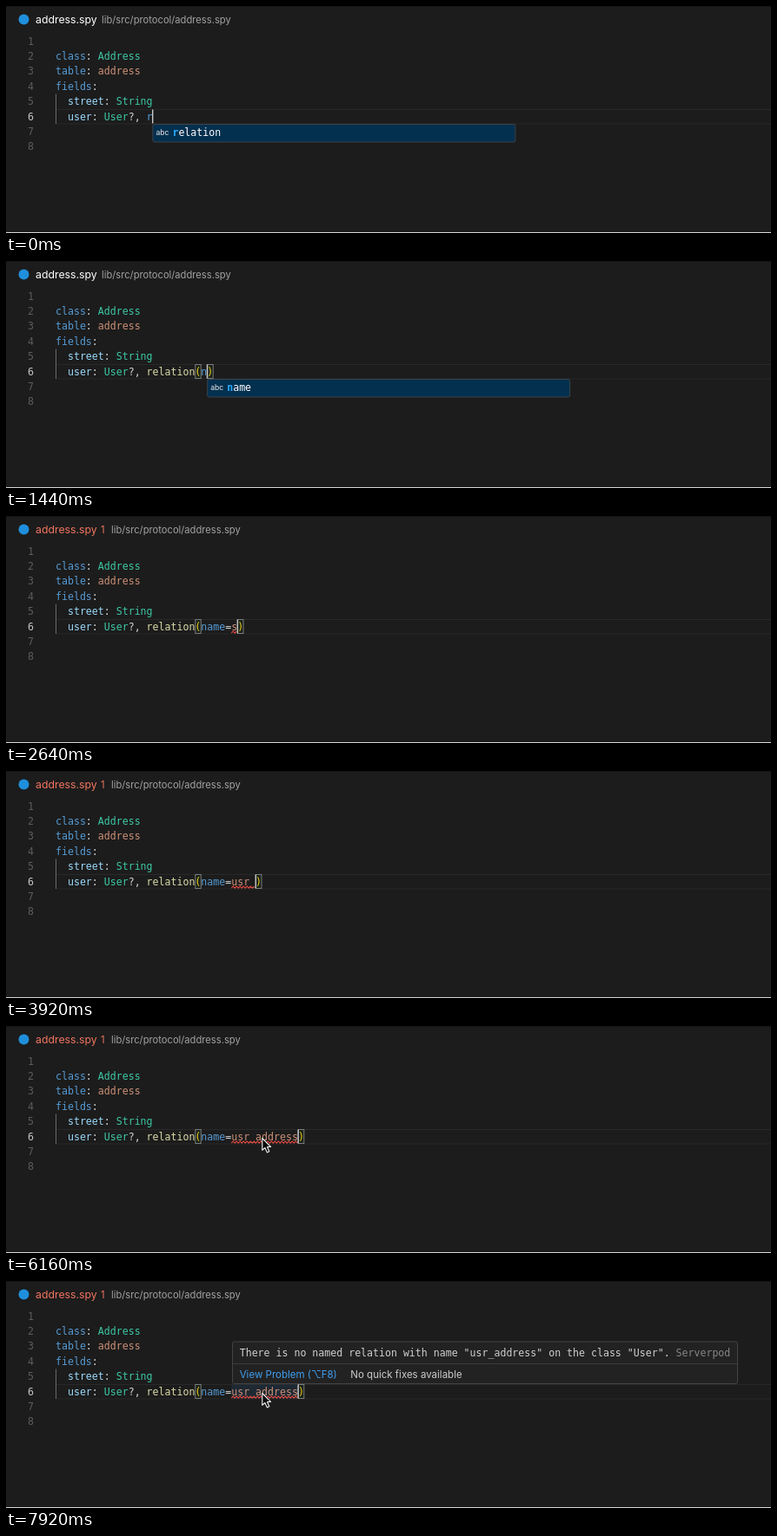
An HTML page that plays this animation: 880x262 px, repeating every 8000 ms.

```html
<!DOCTYPE html>
<html lang="en">
<head>
<meta charset="utf-8">
<title>Editor</title>
<style>
  html, body { margin: 0; width: 100%; height: 100%; overflow: hidden; background: #1c1c1c; }
  svg { display: block; width: 880px; height: 262px; }
  text { white-space: pre; }
  .code { font: 11.585px "DejaVu Sans Mono", monospace; }
  .ui { font: 11.2px Inter, sans-serif; }
  .title { font: 12.3px Inter, sans-serif; }
  .tip { font: 11.5px Inter, sans-serif; }
  .abc { font: 8.6px Inter, sans-serif; }
</style>
</head>
<body>
<svg id="stage" viewBox="0 0 880 262" xmlns="http://www.w3.org/2000/svg"></svg>
<script>
const LOOP = 8000, STEP = 80;
const CHAR = 6.975, LEFT = 57, PITCH = 17.4;
const C = {
  text: '#d4d4d4', key: '#569cd6', type: '#3dc9a5', str: '#ce9178', prop: '#9cdcfe',
  func: '#dcdcaa', gold: '#f0cc20', error: '#f0745f', match: '#2aaaff', dim: '#868686'
};

const svg = document.getElementById('stage');

function add(parent, tag, attrs = {}) {
  const node = document.createElementNS(svg.namespaceURI, tag);
  for (const k in attrs) node.setAttribute(k, attrs[k]);
  parent.appendChild(node);
  return node;
}

function rect(parent, x, y, width, height, fill, extra = {}) {
  return add(parent, 'rect', { x, y, width, height, fill, ...extra });
}

// Each part is [string, colour, weight].
function fillText(node, parts) {
  node.replaceChildren();
  for (const [str, fill, weight = 400] of parts) {
    add(node, 'tspan', { fill, 'font-weight': weight }).textContent = str;
  }
}

function label(parent, cls, x, y, ...parts) {
  const node = add(parent, 'text', { class: cls, x, y });
  fillText(node, parts);
  return node;
}

const show = (node, on) => node.setAttribute('visibility', on ? 'visible' : 'hidden');
const lineY = n => 62 + PITCH * (n - 2);
const colX = n => LEFT + CHAR * n;

// Window
rect(svg, 0, 0, 880, 262, '#1c1c1c');
rect(svg, 0, 0, 880, 1, '#141414');
rect(svg, 0, 261, 880, 1, '#d8d8d8');
add(svg, 'circle', { cx: 20.5, cy: 15.5, r: 6, fill: '#1f8fdc' });
const title = label(svg, 'title', 34, 19.8);
const count = label(svg, 'ui', 109, 19.6, ['1', C.error]);
const path = label(svg, 'ui', 110, 19.5, ['lib/src/protocol/address.spy', '#a2a2a2']);

// Static code
rect(svg, LEFT, 119, 823, 1, '#292929');
rect(svg, LEFT, 135.5, 823, 1, '#292929');
rect(svg, LEFT, 101.5, 1, 34.5, '#686868');
for (let n = 1; n <= 8; n++) {
  label(svg, 'code', 25, lineY(n), [String(n), n === 6 ? '#c6c6c6' : '#5c5c5c']);
}
[
  [['class', C.key], [': ', C.text], ['Address', C.type]],
  [['table', C.key], [': ', C.text], ['address', C.str]],
  [['fields', C.key], [':', C.text]],
  [['  street', C.prop], [': ', C.text], ['String', C.type]]
].forEach((parts, i) => label(svg, 'code', LEFT, lineY(i + 2), ...parts));

// Edited line
const wordMark = rect(svg, 0, 119.5, 0, 16, '#264f78', { 'fill-opacity': 0.25 });
const brackets = [0, 1].map(() =>
  rect(svg, 0, 119.5, 6.4, 16, '#006400', { 'fill-opacity': 0.1, stroke: '#858585', 'stroke-width': 0.9 }));
const edit = label(svg, 'code', LEFT, lineY(6));
const wave = add(svg, 'path', { fill: 'none', stroke: '#e5483f', 'stroke-width': 1.1 });
const caret = rect(svg, 0, 119.5, 1.4, 16, '#c8c8c8');

// Completion list
const popup = add(svg, 'g');
rect(popup, 0.5, 136.5, 417, 20.5, '#04304f', { stroke: '#3c4349', rx: 2 });
label(popup, 'abc', 4, 149.3, ['abc', '#e8e8e8']);
const choice = label(popup, 'code', 23, 150);

// Hover card
const card = add(svg, 'g');
rect(card, 260.5, 70, 581, 48.5, '#222223', { stroke: '#434343', rx: 2 });
rect(card, 261, 95, 580, 1, '#3c3c3c');
label(card, 'code', 268.7, 87,
  ['There is no named relation with name "usr_address" on the class "User". ', '#d0d0d0'],
  ['Serverpod', C.dim]);
label(card, 'tip', 268.7, 111.6, ['View Problem (⌥F8)', '#3f9ff0']);
label(card, 'tip', 396.3, 111.6, ['No quick fixes available', '#cccccc']);

const pointer = add(svg, 'path', {
  d: 'M0 0V13.6L3.1 10.8L5.5 16.2L8 15.1L5.7 9.8H9.8Z',
  fill: '#0a0a0a', stroke: '#f2f2f2', 'stroke-width': 1.1, 'stroke-linejoin': 'round'
});

// Typing: strokes of [time, text before the caret]
const strokes = [[0, 'r']];
function type(text, ...times) {
  let now = strokes[strokes.length - 1][1];
  times.forEach((t, i) => {
    now = text[i] === '<' ? now.slice(0, -1) : now + text[i];
    strokes.push([t, now]);
  });
}
type('elation', 160, 240, 400, 480, 640, 720, 800);
type('(name', 1200, 1440, 1600, 1760, 1840);
type('=s<', 2240, 2560, 2960);
type('usr_', 3200, 3360, 3520, 3760);
type('address', 4080, 4160, 4240, 4400, 4480, 4640, 4880);

const ERROR_AT = 2480, BLINK_AT = 5440, BLINK = 480;
const MOVE_AT = 5680, MOVE_END = 6120, HOVER_AT = 6640;

function drawTitle(bad) {
  fillText(title, [['address.spy', bad ? C.error : '#ffffff']]);
  show(count, bad);
  path.setAttribute('x', bad ? 121 : 110);
}

function drawEdit(typed, t) {
  const [, word, open, key, eq, value] = typed.match(/^(\w+)(\(?)(\w*)(=?)(\w*)$/);
  const start = 15;
  const end = colX(start + typed.length);
  fillText(edit, [
    ['  user', C.prop], [': ', C.text], ['User', C.type], ['?, ', C.text],
    [word, open ? C.func : C.key], [open, C.gold], [key, C.key],
    [eq, C.text], [value, C.str], [open && ')', C.gold]
  ]);

  brackets[0].setAttribute('x', colX(start + word.length) + 0.4);
  brackets[1].setAttribute('x', end + 0.4);
  brackets.forEach(b => show(b, open));

  caret.setAttribute('x', end - 0.6);
  show(caret, t < BLINK_AT || Math.floor((t - BLINK_AT) / BLINK) % 2 === 1);

  const from = colX(start + typed.length - value.length);
  let d = '';
  for (let x = from, up = 0; x <= end; x += 2, up ^= 1) {
    d += (d ? 'L' : 'M') + x + ' ' + (up ? 133 : 135.2);
  }
  wave.setAttribute('d', value ? d : '');
  wordMark.setAttribute('x', from);
  wordMark.setAttribute('width', end - from);

  const query = open ? key : word;
  const full = open ? 'name' : 'relation';
  show(popup, query && !eq);
  popup.setAttribute('transform', `translate(${end - 0.2} 0)`);
  fillText(choice, [[query, C.match, 700], [full.slice(query.length), '#ffffff']]);
}

function drawPointer(t) {
  const p = Math.min(1, Math.max(0, (t - MOVE_AT) / (MOVE_END - MOVE_AT)));
  const rest = (1 - p) ** 2;
  pointer.setAttribute('transform', `translate(${294.8 + 527 * rest} ${129.7 + 92 * rest})`);
  show(pointer, t >= MOVE_AT);
}

function draw(time) {
  const t = Math.floor(time / STEP) * STEP;
  const typed = strokes.filter(s => s[0] <= t).pop()[1];
  drawTitle(t >= ERROR_AT);
  drawEdit(typed, t);
  drawPointer(t);
  show(card, t >= HOVER_AT);
  show(wordMark, t >= HOVER_AT);
}

const begin = performance.now();
function tick() {
  draw((performance.now() - begin) % LOOP);
  requestAnimationFrame(tick);
}
tick();
</script>
</body>
</html>
```
